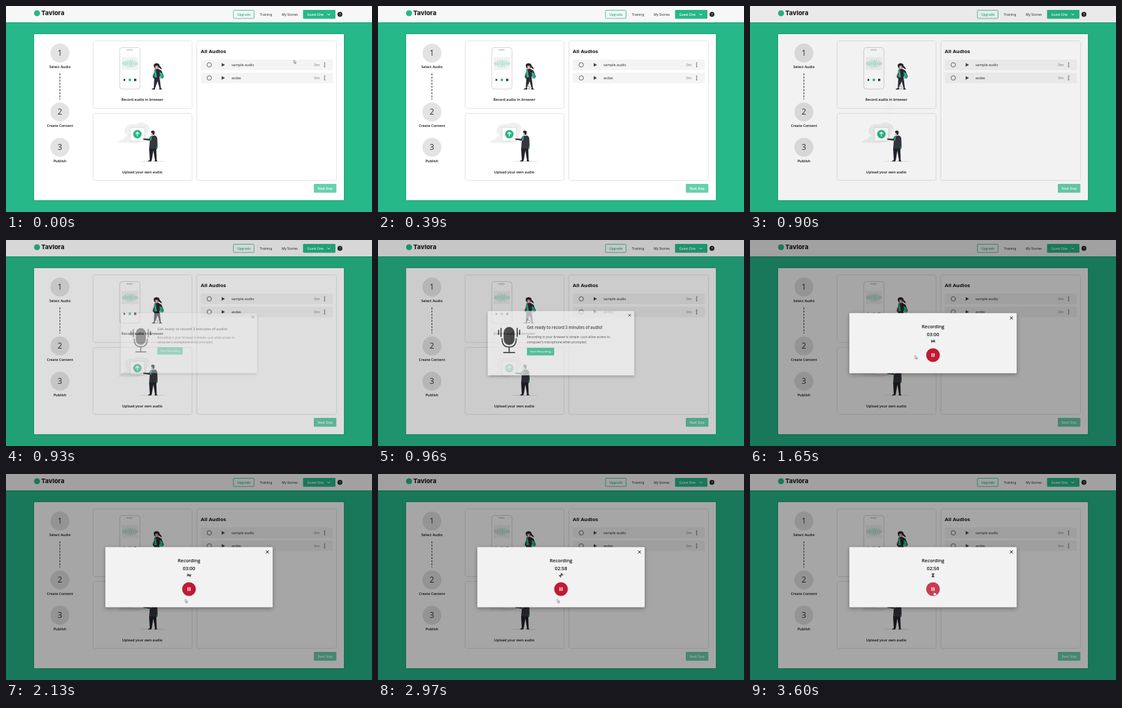
An HTML page that plays this animation: 560x315 px, repeating every 3630 ms.

```html
<!DOCTYPE html>
<html lang="en">
<head>
<meta charset="utf-8">
<title>Audio recorder</title>
<style>
html, body { margin: 0; width: 100%; height: 100%; overflow: hidden; background: #26b888; }
svg { display: block; width: 100vw; height: 100vh; }
text { font: 5.5px "Open Sans", "Noto Sans", sans-serif; fill: #222; }
.semi { font-weight: 600; fill: #111; }
.mid { text-anchor: middle; }
.nav { font-size: 5px; }
.btn { font-size: 4.9px; font-weight: 600; fill: #fff; }
.head { font-size: 7px; font-weight: 600; fill: #111; }
.num { font-size: 12px; fill: #333; }
.logo { font: 800 9.6px Inter, sans-serif; fill: #222; }
.card { fill: #fff; filter: drop-shadow(0 .5px 1px #0004); }
.box { fill: #f2f2f2; filter: drop-shadow(0 2px 3px #0005); }
.shade, .ask, .rec, .cursor, .hand, .arrow, .hover, .glass {
  animation: 3630ms linear infinite;
}
.shade { animation-name: shade; }
.ask { animation-name: ask; transform-origin: 280px 157.5px; }
.rec { animation-name: rec; }
.cursor { animation-name: move; }
.hand { animation-name: hand; }
.arrow { animation-name: arrow; }
.hover { animation-name: hover; }
.glass { animation-name: spin; transform-origin: 280px 154.8px; }
@keyframes shade {
  0%, 23.97% { opacity: 0; }
  24.79% { opacity: .05; }
  26.45% { opacity: .2; }
  28.93%, 100% { opacity: .35; }
}
@keyframes ask {
  0%, 24.8% { opacity: 0; transform: scale(.75); }
  26.45% { opacity: .72; transform: scale(.875); }
  28.93%, 39.66% { opacity: 1; transform: none; }
  39.67%, 100% { opacity: 0; transform: none; }
}
@keyframes rec {
  0%, 39.66% { opacity: 0; }
  39.67%, 100% { opacity: 1; }
}
@keyframes move {
  0% { transform: translate(440.5px, 82.5px); animation-timing-function: ease-in-out; }
  10.74%, 30.58% { transform: translate(229px, 120px); animation-timing-function: ease-in-out; }
  38%, 42.15% { transform: translate(246px, 172px); animation-timing-function: ease-in-out; }
  52.07%, 88.15% { transform: translate(274.5px, 191.5px); animation-timing-function: ease-in-out; }
  96.42%, 100% { transform: translate(281.7px, 179px); }
}
@keyframes hand {
  0%, 9.09% { opacity: 0; }
  9.1%, 27.49% { opacity: 1; }
  27.5%, 37.19% { opacity: 0; }
  37.2%, 39.66% { opacity: 1; }
  39.67%, 92.99% { opacity: 0; }
  93%, 100% { opacity: 1; }
}
@keyframes arrow {
  0%, 9.09% { opacity: 1; }
  9.1%, 27.49% { opacity: 0; }
  27.5%, 37.19% { opacity: 1; }
  37.2%, 39.66% { opacity: 0; }
  39.67%, 92.99% { opacity: 1; }
  93%, 100% { opacity: 0; }
}
@keyframes hover {
  0%, 92.99% { fill: #c01a34; }
  93%, 100% { fill: #cb3c52; }
}
@keyframes spin {
  from { transform: rotate(-2834deg); }
  to { transform: rotate(24deg); }
}
</style>
</head>
<body>
<svg viewBox="0 0 560 315" preserveAspectRatio="none">
  <defs>
    <g id="row">
      <rect x="298" width="202" height="16" rx="1" fill="#f4f4f4"/>
      <circle cx="311" cy="8" r="3.4" fill="none" stroke="#444" stroke-width=".8"/>
      <path d="M330 5.3v5.4l5-2.7z" fill="#444"/>
      <g fill="#222"><circle cx="487.5" cy="5.3" r=".8"/><circle cx="487.5" cy="8" r=".8"/><circle cx="487.5" cy="10.7" r=".8"/></g>
      <text x="471.5" y="9.5" style="fill:#777">0m</text>
    </g>
    <path id="close" d="M-2.2-2.2l4.4 4.4M2.2-2.2l-4.4 4.4" stroke="#111" stroke-width="1"/>
    <pattern id="mesh" width="2.4" height="2.4" patternUnits="userSpaceOnUse">
      <rect width="2.4" height="2.4" fill="#141414"/>
      <circle cx="1.2" cy="1.2" r=".45" fill="#555"/>
    </pattern>
  </defs>

  <!-- page -->
  <rect width="560" height="315" fill="#26b888"/>
  <rect width="560" height="25" fill="#f7f7f7" style="filter:drop-shadow(0 .5px 1px #0004)"/>
  <circle cx="47.5" cy="11" r="4.6" fill="#26b888"/>
  <text class="logo" x="54" y="14.3">Tavlora</text>
  <rect x="348" y="6.5" width="31.5" height="12.5" rx="1" fill="none" stroke="#26b888" stroke-width=".8"/>
  <text class="btn mid" x="364" y="14.6" style="fill:#26b888">Upgrade</text>
  <text class="nav" x="388.5" y="14.6">Training</text>
  <text class="nav" x="422" y="14.6">My Stories</text>
  <rect x="454.5" y="6" width="49.5" height="13.5" rx="1.2" fill="#26b888"/>
  <text class="btn" x="461" y="14.6">Guest One</text>
  <path d="M491.7 11.8l2.2 2.2 2.2-2.2" fill="none" stroke="#fff" stroke-width="1"/>
  <circle cx="511" cy="12.7" r="3.7" fill="#222"/>
  <text class="btn mid" x="511" y="14.7">?</text>

  <rect class="card" x="43" y="43" width="474" height="254" rx="1"/>
  <path d="M82.5 103v40" stroke="#333" stroke-width="1" stroke-dasharray="3 1.8"/>
  <g id="steps"></g>

  <rect class="card" x="134" y="54" width="150" height="102" rx="2"/>
  <rect class="card" x="134" y="165" width="150" height="101" rx="2"/>
  <rect class="card" x="292.5" y="54" width="212.5" height="212" rx="2"/>
  <text class="semi mid" x="208.7" y="145">Record audio in browser</text>
  <text class="semi mid" x="208.5" y="255.5">Upload your own audio</text>

  <!-- phone -->
  <rect x="174" y="63.5" width="31" height="63.5" rx="4" fill="#fff" stroke="#d4d4d4" stroke-width="1"/>
  <rect x="184" y="66" width="10" height="2.2" rx="1.1" fill="#d4d4d4"/>
  <rect x="177" y="78" width="25" height="20" fill="#f3f3f3"/>
  <path id="wave" stroke="#8ed8bf" stroke-width=".7" fill="none"/>
  <path d="M180 111v4l3.2-2z" fill="#222"/>
  <circle cx="189.5" cy="113" r="2" fill="#26b888"/>
  <rect x="196" y="111.3" width="3.4" height="3.4" fill="#333"/>

  <!-- woman -->
  <g>
    <ellipse cx="231" cy="127.6" rx="10" ry=".7" fill="#e6e6e6"/>
    <path d="M226 90q1-3 5-2.5 4 .5 4 4 1.5 1 4 5-4-.5-5-3l-3 4q-5-2-5-7.5z" fill="#26232b"/>
    <path d="M228.5 91.5h4v4l-2 2-2-2z" fill="#e9b9ac"/>
    <path d="M227 97l6-1 5 3 3.5 9-2 3-4-4-1 4h-8l-2-2 2-7z" fill="#2c2a33"/>
    <path d="M227 98l2-1 2 12h-4zM235 101l4 2 2 7-5 1z" fill="#26b888"/>
    <path d="M227 110h8l1 7 1 9h-2l-3-11-4 11h-2z" fill="#2c2a33"/>
    <path d="M224 126h4v1.6h-5zM234.5 126h3l1.5 1.6h-4.5z" fill="#111"/>
    <path d="M225.3 103l-1.8 5 2 2" fill="none" stroke="#e9b9ac" stroke-width="1"/>
  </g>

  <!-- upload -->
  <path d="M172 209q1-5 8-5 0-5 7-5-8-5-5-12 4-8 15-6 8-5 17-1 8 3 5 10-2 5-4 8 1 7-6 9l-10 3z" fill="#f0f0f0"/>
  <rect x="190" y="185.5" width="22" height="21" fill="#fff" stroke="#d2d2d2" stroke-width=".7"/>
  <circle cx="201" cy="196" r="6.5" fill="#26b888"/>
  <path d="M201 199.3v-6M198.4 195.5l2.6-2.6 2.6 2.6" fill="none" stroke="#fff" stroke-width="1.2"/>
  <g>
    <ellipse cx="225" cy="237.6" rx="20" ry=".7" fill="#e6e6e6"/>
    <path d="M222 191.5q3-2 5.5.5l-.5 5h-4z" fill="#26232b"/>
    <path d="M222 194l2 0 1 4-2.5.5z" fill="#e9b9ac"/>
    <path d="M221 199l7-1q3 1 3.5 5l.5 14-1.5 2h-11.500l1-13-10-1.500v-2l9 .5z" fill="#37363e"/>
    <path d="M221 199l2 .5-1 7-2-1zM231 213l1 5h-2z" fill="#26b888"/>
    <path d="M210.500 202.600l-2 .700" stroke="#e9b9ac" stroke-width="1.300"/>
    <path d="M219 218h11l.5 18h-2.500l-2.500-15-2.500 15h-3z" fill="#24232a"/>
    <path d="M218.500 236h4v1.500h-5.500zM227.500 236h3l1.500 1.500h-4.500z" fill="#111"/>
  </g>

  <text x="298" y="72" class="semi" style="font-size:7.8px;font-weight:700">All Audios</text>
  <use href="#row" y="82"/>
  <use href="#row" y="102"/>
  <text x="345" y="92">sample audio</text>
  <text x="345" y="112">asdas</text>
  <rect x="471" y="272" width="34.500" height="13.500" rx="1" fill="#68cfae"/>
  <text class="btn mid" x="488.300" y="280.700">Next Step</text>

  <rect class="shade" width="560" height="315"/>

  <!-- prompt -->
  <g class="ask">
    <rect class="box" x="152" y="101.500" width="256" height="112.500" rx="1"/>
    <use href="#close" x="400" y="109"/>
    <g fill="none" stroke="#141414" stroke-width="2" stroke-linecap="round">
      <path d="M171 135.500v7M175.300 132v14M203.500 132v14M207.800 135.500v7"/>
      <path d="M177 150q0 14.500 12.400 14.500t12.400-14.500M189.400 165v9M180 174.300h19"/>
    </g>
    <rect x="180.500" y="130" width="17.800" height="30.500" rx="8.900" fill="url(#mesh)" stroke="#141414" stroke-width="1"/>
    <text class="head" x="220.500" y="133.500">Get ready to record 3 minutes of audio!</text>
    <text x="220.500" y="149.300">Recording in your browser is simple—just allow access to</text>
    <text x="220.500" y="157.800">computer's microphone when prompted</text>
    <rect x="220.500" y="165.700" width="47.500" height="13.600" rx="1" fill="#26b888"/>
    <text class="btn mid" x="244.300" y="174.300">Start Recording</text>
  </g>

  <!-- recorder -->
  <g class="rec">
    <rect class="box" x="152" y="111.700" width="256" height="92" rx="1"/>
    <use href="#close" x="400" y="119.300"/>
    <text class="head mid" x="280" y="135" style="font-size:7.200px">Recording</text>
    <text class="head mid" id="timer" x="280" y="146.500" style="font-size:7.400px">03:00</text>
    <path class="glass" d="M277.800 152.500h4.400M277.800 157.100h4.400M278.500 152.500q0 1.500 1.500 2.300-1.500.800-1.500 2.300h3q0-1.500-1.500-2.300 1.500-.800 1.500-2.300" fill="#555" stroke="#222" stroke-width=".6"/>
    <circle class="hover" cx="280" cy="176" r="10.500"/>
    <path d="M278.500 173.300v5.400M281.500 173.300v5.400" stroke="#fff" stroke-width="1.500"/>
  </g>

  <g class="cursor" fill="#fff" stroke="#333" stroke-width=".5" stroke-linejoin="round">
    <path class="arrow" d="M0 0v5l1.200-1 .8 1.800.8-.4-.8-1.700h1.600z"/>
    <path class="hand" d="M-.6.500q.6-.8 1.200 0v2.200l2.400.600q.6.300.5 1l-.6 2.400h-2.900l-2-2.500q0-.8.600-.7l.8.600z"/>
  </g>
</svg>
<script>
const LOOP = 3630, TICK = 400, FIRST_TICK = 2280;
const $ = id => document.getElementById(id);

$('steps').innerHTML = [['Select Audio', 72], ['Create Content', 162], ['Publish', 216]]
  .map(([label, y], i) => `<circle cx="82.500" cy="${y}" r="14.500" fill="#e3e3e3"/>
    <text class="num mid" x="82.500" y="${y + 4.4}">${i + 1}</text>
    <text class="semi mid" x="82.500" y="${y + 23}">${label}</text>`).join('');

let wave = '';
for (let i = 0; i < 17; i++) {
  const h = 1 + 6 * Math.abs(Math.sin(i * 1.3)) * Math.sin(Math.PI * (i + 1) / 18);
  wave += `M${178 + i * 1.45} ${88 - h}v${2 * h}`;
}
$('wave').setAttribute('d', wave);

const animations = document.getAnimations();

// Countdown shares the clock of the keyframes.
function tick() {
  const t = (animations[0].currentTime || 0) % LOOP;
  const gone = Math.max(0, Math.floor((t - FIRST_TICK) / TICK) + 1);
  const left = 180 - gone;
  const pad = n => String(n).padStart(2, '0');
  $('timer').textContent = `${pad(Math.floor(left / 60))}:${pad(left % 60)}`;
  requestAnimationFrame(tick);
}
tick();
</script>
</body>
</html>
```
